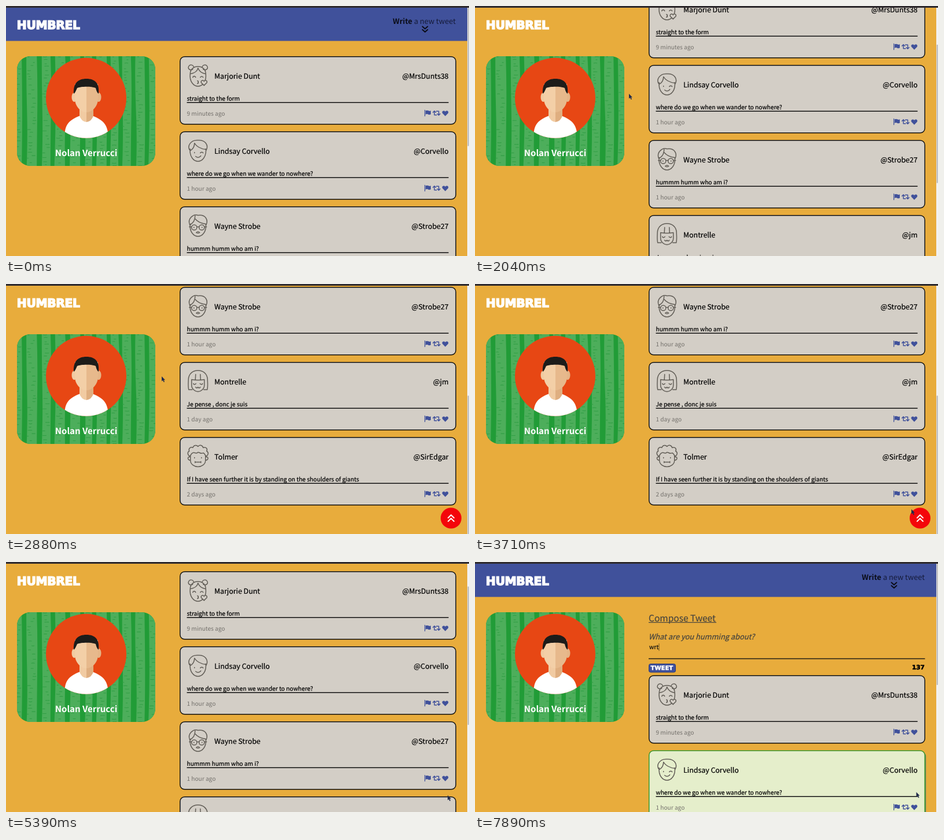
These frames come from a looping animation (800 px wide and 433 px high, 8 s). An HTML page:

```html
<!DOCTYPE html>
<html lang="en">
<head>
<meta charset="utf-8">
<title>Humbrel</title>
<style>
html, body { margin: 0; width: 100%; height: 100%; overflow: hidden; background: #e8ac3c; }
svg { display: block; width: 100vw; height: 100vh; }
text {
  font-family: "Noto Sans CJK JP", "Noto Sans CJK SC", "Noto Sans", sans-serif;
  white-space: pre; text-rendering: geometricPrecision;
}
.semi { stroke: #000; stroke-width: .22; }
.light { font-weight: 300; }
.block { font-family: "DejaVu Sans", sans-serif; font-weight: 700; }
.line { fill: none; stroke-linecap: round; stroke-linejoin: round; }
.end { text-anchor: end; }
</style>
</head>
<body>
<svg id="stage" viewBox="0 0 800 433" preserveAspectRatio="none"></svg>
<script>
const LOOP = 8000, STEP = 92.85;
const BLUE = '#40519b', ORANGE = '#e8ac3c';
const MAX_SCROLL = 342, FORM_H = 109, VIEW_H = 430;
const CARD = { x: 300, y: 87, w: 478, h: 118.5, gap: 130 };
const BUTTON = { x: 769, y: 405.5, r: 18 };

const clamp = v => Math.min(1, Math.max(0, v));
const span = (t, a, b) => clamp((t - a) / (b - a));
const swing = p => .5 - Math.cos(p * Math.PI) / 2;
const $ = id => document.getElementById(id);
const show = (id, on) => $(id).setAttribute('visibility', on ? 'visible' : 'hidden');
const set = (id, attrs) => { for (const k in attrs) $(id).setAttribute(k, attrs[k]); };

function text(x, y, size, str, attrs = '') {
  return `<text x="${x}" y="${y}" font-size="${size}" ${attrs}>${str}</text>`;
}
function line(d, attrs = '') {
  return `<path class="line" d="${d}" ${attrs}/>`;
}
function circle(x, y, r, attrs = '') {
  return `<circle cx="${x}" cy="${y}" r="${r}" ${attrs}/>`;
}
function random(seed) {
  return () => (seed = seed * 16807 % 2147483647) / 2147483647;
}

// Line-drawn faces, centred on 0,0
const jaw = 'M-13.5-3C-15 11-7 18.5 0 18.5S15 11 13.5-3';
const heart = 'M0 4.6L-4.6 0C-6.6-3-2.4-6 0-2.6C2.4-6 6.6-3 4.6 0Z';
const faces = [
  line(jaw + 'M-13.5-3C-13-20 13-20 13.5-3M-13-3C-6-4-1-8 0-13C2-8 7-4 13-3'
    + 'M-9-11C-14-8-18-12-16-16S-8-19-7-14M9-11C14-8 18-12 16-16S8-19 7-14'
    + 'M-9 3Q-6.500-1-4 3M4 3Q6.500 0 9 3M-1 9Q2 10 0 11.500Q2 12.500-1 14')
    + `<path d="${heart}" transform="translate(10.500 12.500)" fill="#d3cec6"/>`,
  line(jaw + 'M-13.500 0C-20-8-12-19 0-18C13-19 19-9 14 0M-13.500 0C-8-3-6-8-6-13C-2-6 6-3 14-2'
    + 'M-6 3V4M4 4Q6.500 1.500 9 4M-4 10Q1 14 5 9'),
  line(jaw + 'M-14-1C-19-13-7-21 0-18C14-20 18-9 14-1M-13-2C-8-5-5-9-5-17M-5-12C-1-7 6-4 13-3'
    + 'M-15 2H-11M-2 2H2M11 2H15M-7 2.500V3.500M7 2.500V3.500M-3 12Q0 9 3 12Q0 14-3 12')
    + circle(-6.5, 3, 4.6, 'fill="none"') + circle(6.5, 3, 4.6, 'fill="none"'),
  line('M-10 14.500H-16C-17.500 8-16.500 0-16.500-3C-16-24 16-24 16.500-3C16.500 0 17.500 8 16 14.500H10'
    + 'M-11-3V7C-11 13-5 18 0 18S11 13 11 7V-3M-11-3Q0-1 11-3M-4.500-3L-4-12M4.500-3L4-12'
    + 'M-8 4Q-6 7-3.500 4M3.500 4Q6 7 8 4M-4 10Q-2 13 0 10Q2 13 4 10'),
  line('M-13-2V7C-13 14-6 18 0 18S13 14 13 7V-2M-13 7C-19 6-18 0-14 1M13 7C19 6 18 0 14 1'
    + 'M-14 0C-19-3-18-8-15-9C-17-14-12-17-9-15C-7-20-2-20 0-17C3-21 8-19 9-15'
    + 'C14-17 17-13 15-9C19-7 18-2 14 0C12-2 12-5 9-6C5-3 2-8 0-7C-3-3-6-8-9-6C-12-5-12-2-14 0'
    + 'M-6 2V3M6 2V3M-5 10H5M-5 9V11M5 9V11')
];

const posts = [
  ['Marjorie Dunt', '@MrsDunts38', 'straight to the form', '9 minutes ago'],
  ['Lindsay Corvello', '@Corvello', 'where do we go when we wander to nowhere?', '1 hour ago'],
  ['Wayne Strobe', '@Strobe27', 'hummm humm who am i?', '1 hour ago'],
  ['Montrelle', '@jm', 'Je pense , donc je suis', '1 day ago'],
  ['Tolmer', '@SirEdgar', 'If I have seen further it is by standing on the shoulders of giants', '2 days ago']
];

const actions = `<g fill="${BLUE}" stroke="${BLUE}">
  ${line('M423.700 93.500V103.500', 'stroke-width="1.300"')}
  <path d="M425 94.300Q427.500 93 430 94.300T434 94V100.500Q432 102 429.500 100.700T425 101Z" stroke="none"/>
  ${line('M440.200 95V101.700H444M437.800 97.200L440.200 94.800L442.600 97.200M443.600 95.300H447.700V102M445.300 99.800L447.700 102.200L450.100 99.800', 'stroke-width="1.500"')}
  <path d="${heart}" transform="translate(459 98.800) scale(1.050)" stroke="none"/></g>`;

function card([name, handle, body, age], i) {
  const box = 'x=".75" y=".75" width="476.5" height="117" rx="8"';
  return `<g id="card${i}">
    <rect id="shade${i}" ${box} transform="translate(2 2)" fill="#5d8760"/>
    <rect id="box${i}" ${box} stroke-width="1.5"/>
    <g transform="translate(31.7 33.5)" stroke="#625e57" stroke-width="1.5" fill="none">${faces[i]}</g>
    ${text(60, 38.6, 12.4, name, 'class="semi"')}
    ${text(464.7, 38.6, 12.4, handle, 'class="semi end"')}
    ${text(12.5, 76.7, 10.2, body, 'class="semi"')}
    <path d="M12.5 80.2H464.7" stroke="#111" stroke-width="1.4"/>
    ${text(12.5, 102.8, 10.1, age, 'class="light" fill="#74716c"')}
    ${actions}</g>`;
}

function birches() {
  const rnd = random(77);
  let trunks = '', marks = '';
  for (let x = 14; x < 262;) {
    const w = 13 + rnd() * 5, k = rnd() * 3 - 1.5;
    trunks += `M${x} 85Q${x + k} 130 ${x + 1} 180T${x - k} 280H${x + w}Q${x + w - k} 230 ${x + w + 1} 180T${x + w} 85Z`;
    for (let y = 88; y < 278; y += 4 + rnd() * 7) {
      const l = 2 + rnd() * 5, mx = x + 1 + rnd() * (w - l - 2);
      marks += `M${mx} ${y}q${l / 2} ${rnd() * 2 - 1} ${l} 0`;
    }
    x += w + 6 + rnd() * 3;
  }
  return `<rect x="19" y="87" width="239" height="190" fill="#219c37"/>
    <path d="${trunks}" fill="#4dae5b"/>${line(marks, 'stroke="#319f45" stroke-width="1.1"')}`;
}

const profile = `<g clip-path="url(#badge)">${birches()}</g>
  ${circle(138.5, 159.3, 69.5, 'fill="#e74714"')}
  <g clip-path="url(#portrait)">
    <path d="M101 229C101 207 107 198 128 190H149C170 198 176 207 177 229Z" fill="#fff"/>
    <path d="M127 172V190Q130 200 139 201V172Z" fill="#f1cba2"/>
    <path d="M151 172V190Q148 200 139 201V172Z" fill="#dfae80"/>
    <ellipse cx="118" cy="158" rx="4.500" ry="8" fill="#f1cba2"/>
    <ellipse cx="160" cy="158" rx="4.500" ry="8" fill="#e5b587"/>
    <path d="M139 135H119V160C119 174 129 184 139 184Z" fill="#f3cfa7"/>
    <path d="M139 135H159V160C159 174 149 184 139 184Z" fill="#e7b98c"/>
    <path d="M117 152C116 134 124 126 139 126S162 134 160 152C157 150 156 146 155 142C148 139 130 139 123 142C121 146 120 150 117 152Z" fill="#1d1c1a"/>
  </g>
  ${text(138.5, 259.5, 15, 'Nolan Verrucci', 'fill="#fff" font-weight="700" text-anchor="middle"')}`;

const form = `<g clip-path="url(#slide)">
  ${text(300, 102.6, 15.5, 'Compose Tweet', 'fill="#4b473e" stroke="#4b473e" stroke-width=".2"')}
  <path d="M300 104.7H417" stroke="#4b473e" stroke-width="1.2"/>
  ${text(300, 133.7, 12.85, 'What are you humming about?', 'font-style="italic" fill="#4b473e" stroke="#4b473e" stroke-width=".3"')}
  ${text(301, 151.2, 10.45, '', 'id="draft"')}
  <path id="caret" d="M318.5 141V154" stroke="#5c4a22" stroke-width=".8"/>
  <path d="M300 167.500H777.500" stroke="#221d14" stroke-width="1.600"/>
  <rect x="300.500" y="176.500" width="46" height="14.500" rx="3" fill="${BLUE}" stroke="#2f3c77"/>
  ${text(303.5, 187.3, 10.1, 'TWEET', 'class="block" fill="#fff" stroke="#fff" stroke-width=".5"')}
  ${text(777, 186, 10.6, '140', 'id="count" class="block end" stroke-width=".6"')}</g>`;

$('stage').innerHTML = `<defs>
  <clipPath id="badge"><rect x="19" y="87" width="239" height="190" rx="23"/></clipPath>
  <clipPath id="portrait">${circle(138.5, 159.3, 69.5)}</clipPath>
  <clipPath id="slide"><rect id="slideBox" x="290" y="80" width="500" height="0"/></clipPath></defs>
  <rect width="800" height="433" fill="${ORANGE}"/>
  ${profile}${form}${posts.map(card).join('')}
  <g id="header"><rect y="2" width="798" height="58.500" fill="${BLUE}"/>
    ${text(777, 30.6, 12.8, '<tspan font-weight="700" fill="#0b0d18">Write</tspan> a new tweet', 'class="light end" fill="#151b3a"')}
    ${line('M719.500 35.500L724 39.500L728.500 35.500M719.500 41L724 45L728.500 41', 'stroke="#0b0d18" stroke-width="1.900"')}</g>
  ${text(18.8, 39.5, 20.2, 'HUMBREL', 'class="block" fill="#fff" stroke="#fff" stroke-width="1.5" letter-spacing="-.3"')}
  <g id="up">${circle(BUTTON.x, BUTTON.y, BUTTON.r, 'fill="#f4060a"')}
    ${circle(BUTTON.x, BUTTON.y, BUTTON.r, 'id="ring" fill="none" stroke="#111" stroke-width="2.2"')}
    ${line('M764 405L769 400L774 405M764 411L769 406L774 411', 'stroke="#fff" stroke-width="2"')}</g>
  <rect x="797" width="3" height="433" fill="#f1f1f1"/>
  <rect id="thumb" x="797.500" width="2.500" fill="#bfbfc1"/>
  <rect width="800" height="3" fill="#2f2b2e"/>
  <path id="cursor" d="M0 0V8.500L2 6.800L3.500 10L5 9.400L3.600 6.200H6Z" fill="#222b4c"/>`;

// time, x, y
const path = [
  [1000, 285, 322], [1570, 266, 152], [2690, 266, 152], [2880, 269, 160], [3080, 269, 160],
  [3710, 754, 390], [3990, 762, 400], [4740, 764, 405], [5570, 763, 404], [6030, 762.5, 398.5]
];
function pointer(t) {
  let i = path.findIndex(p => p[0] > t);
  if (i < 0) return path[path.length - 1].slice(1);
  if (i === 0) i = 1;
  const [a, b] = [path[i - 1], path[i]];
  const p = swing(span(t, a[0], b[0]));
  return [a[1] + (b[1] - a[1]) * p, a[2] + (b[2] - a[2]) * p];
}

function scrollAt(t) {
  const down = 1 - (1 - span(t, 1800, 2870)) ** 1.592;
  return Math.round(MAX_SCROLL * (down - swing(span(t, 4967, 5565))));
}

function render(time) {
  const t = Math.floor(time / 92.8 + .05) * STEP;
  const scroll = scrollAt(t);
  const open = FORM_H * swing(span(t, 5640, 6030));
  const [x, y] = pointer(t);
  const seen = t > 1000, up = scroll > 150;
  const onButton = up && Math.hypot(x - BUTTON.x, y - BUTTON.y) < BUTTON.r;
  const settled = t < 4900 || t > 5570;

  posts.forEach((_, i) => {
    const top = CARD.y + i * CARD.gap + open - scroll;
    const hot = seen && settled && !onButton && x > CARD.x && x < CARD.x + CARD.w && y > top && y < top + CARD.h;
    set('card' + i, { transform: `translate(${CARD.x} ${top.toFixed(2)})` });
    set('box' + i, { fill: hot ? '#e5eecb' : '#d3cec6', stroke: hot ? '#3b9428' : '#111' });
    show('shade' + i, hot);
  });

  show('header', scroll < 60);
  show('up', up);
  show('ring', onButton);
  show('cursor', seen);
  set('cursor', { transform: `translate(${x.toFixed(2)} ${y.toFixed(2)})` });
  set('slideBox', { height: open > 0 ? open + 7 : 0 });

  const page = VIEW_H + MAX_SCROLL + open;
  set('thumb', { y: 3 + scroll * VIEW_H / page, height: VIEW_H * VIEW_H / page });

  // each key press is followed one step later by the counter
  const steps = t < 7420 ? 0 : 1 + Math.floor((t - 7420) / 93);
  const typed = Math.min(3, Math.ceil(steps / 2)), counted = Math.min(3, Math.floor(steps / 2));
  const draft = $('draft');
  draft.textContent = typed ? 'wrt'.slice(0, typed) : 'Please do share...';
  set('draft', { fill: typed ? '#111' : '#77736d', stroke: '#111', 'stroke-width': typed ? .2 : 0 });
  $('count').textContent = 140 - counted;
  const ink = counted ? '#000' : '#4b473e';
  set('count', { fill: ink, stroke: ink });
  const end = typed ? 301 + draft.getComputedTextLength() + .6 : 301;
  set('caret', { d: `M${end} 141V154` });
  show('caret', typed > 0 || (t > 6680 && t < 7140));
}

function frame() {
  render(performance.now() % LOOP);
  requestAnimationFrame(frame);
}
frame();
</script>
</body>
</html>
```
